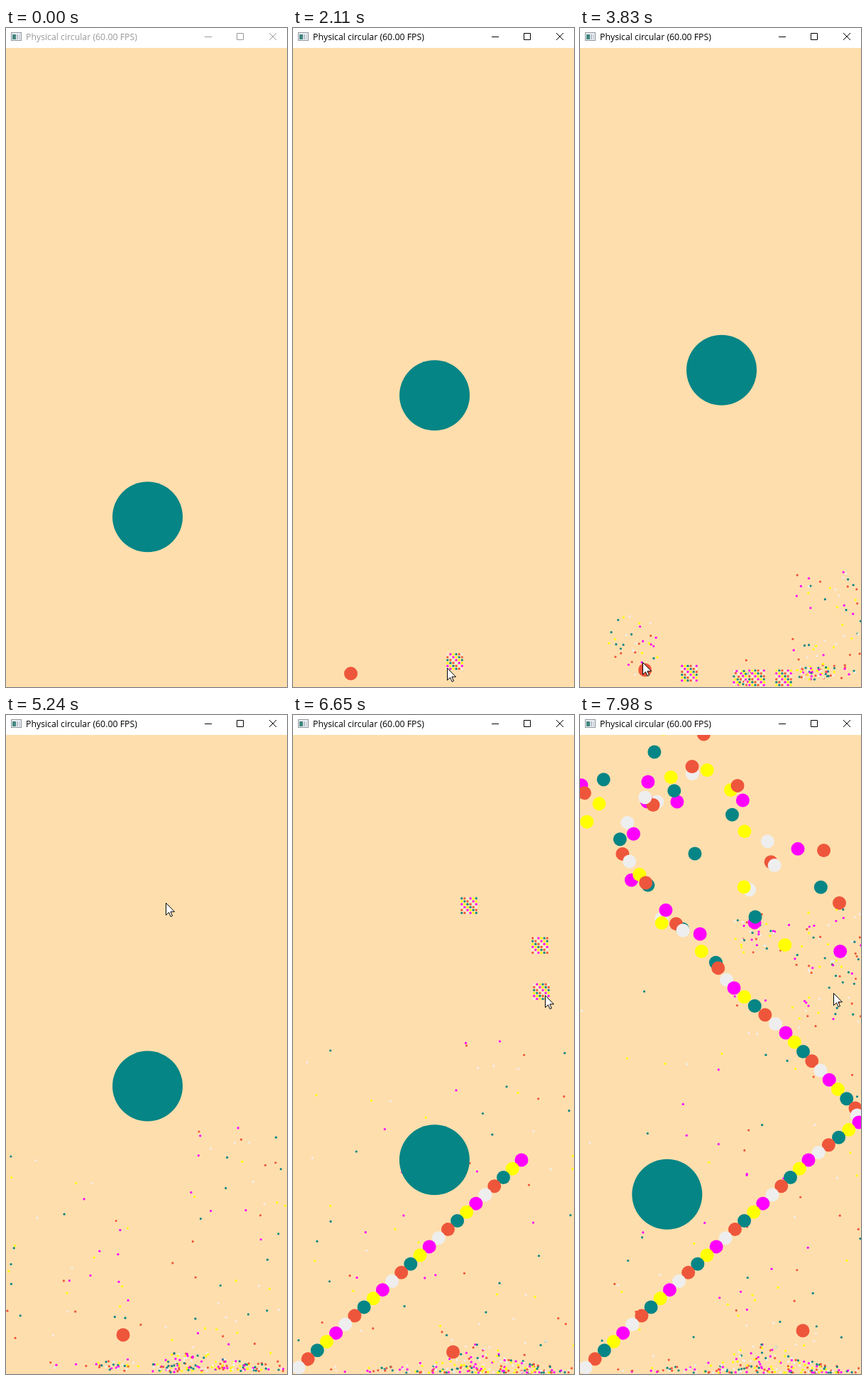
An HTML page with a canvas that plays this animation: 396 px wide and 927 px high, repeating every 8 s.

```html
<!DOCTYPE html>
<html lang="en">
<head>
<meta charset="utf-8">
<title>Physical circular</title>
<style>
  html, body { margin: 0; width: 100%; height: 100%; overflow: hidden; background: #ffdead; }
  canvas, svg { position: absolute; left: 0; top: 0; display: block; }
  svg { background: #fff; color: #999; }
  svg.active { color: #000; }
  text { font: 12.3px "Open Sans", "Noto Sans", sans-serif; fill: currentColor; }
  .buttons { fill: none; stroke: currentColor; }
</style>
</head>
<body>
<canvas id="stage" width="396" height="927"></canvas>
<svg id="bar" width="396" height="28">
  <rect x="7.5" y="6.5" width="14" height="11" fill="#eef1f4" stroke="#8d959d"/>
  <rect x="9" y="9" width="5" height="7" fill="#42867f"/>
  <rect x="15" y="9" width="2" height="7" fill="#b4c0ca"/>
  <rect x="18" y="9" width="2" height="7" fill="#ccd5dd"/>
  <text x="28" y="17">Physical circular (<tspan id="fps">60.00</tspan> FPS)</text>
  <g class="buttons">
    <path d="M280 12.5h10M325.5 7.5h9v9h-9z"/>
    <path d="M371 7l10 10M381 7l-10 10"/>
  </g>
</svg>
<script>
const WIDTH = 396, HEIGHT = 927, FLOOR = 925, LOOP = 8000, STEP = 78.3;
const HALF_GRAVITY = 15.8;
const TEAL = '#058585', RED = '#ee563b';
const PALETTE = ['#eeeeee', '#ff00ff', '#ffff00', TEAL, RED];

const ctx = document.getElementById('stage').getContext('2d');
const bar = document.getElementById('bar');
const fps = document.getElementById('fps');

const clamp = v => Math.max(0, Math.min(1, v));
const mix = (a, b, p) => a + (b - a) * p;
const random = (i, salt) => {
  const v = Math.sin(i * 127.1 + salt * 311.7) * 43758.5453;
  return v - Math.floor(v);
};
const fold = x => {
  x = Math.abs(x);
  return x > WIDTH ? 2 * WIDTH - x : x;
};

// Position on a path of [time, x, y] points; with gravity each leg is a ballistic arc.
function along(points, t, gravity = 0) {
  let i = 1;
  while (i < points.length - 1 && t > points[i][0]) i++;
  const [t0, x0, y0] = points[i - 1], [t1, x1, y1] = points[i];
  const p = clamp((t - t0) / (t1 - t0));
  return [mix(x0, x1, p), mix(y0, y1, p) - gravity * p * (1 - p) * (t1 - t0) ** 2];
}

function disc([x, y], radius, color) {
  ctx.fillStyle = color;
  ctx.beginPath();
  ctx.arc(x, y, radius, 0, 2 * Math.PI);
  ctx.fill();
}

const POINTER = new Path2D('M0 0V17L4 13.2L6.6 19L9 18L6.4 12.3H12Z');
const POINTER_PATH = [
  [.45, 120, 860], [.85, 72, 903], [1.7, 78, 905], [2.11, 217, 900],
  [3, 375, 900], [3.5, 145, 905], [3.8, 84, 911], [4.9, 215, 250],
  [5.24, 225, 264], [5.4, 243, 248], [6.55, 355, 394], [8, 357, 391]
];

const BALL_PATH = [
  [1.3, 81.5, 898], [2.42, 81.5, 917.5], [3.62, 81.5, 917], [3.83, 91.5, 903],
  [5.24, 165, 872], [6.65, 225.5, 896], [7.44, 285, 865], [7.98, 314, 866]
];

// Thrown up freely, then pushed aside by the jet.
function bigDisc(t) {
  const push = Math.max(0, t - 6.58), held = Math.max(0, t - 6.65);
  const free = t - held;
  const y = 480.6 + HALF_GRAVITY * (free - 3.62) ** 2 + 99 * held - 46.9 * held ** 2;
  return [199.5 - 37.75 * push ** 2.1, y];
}

// Blocks of 6 x 6 dots: spawn time, centre, burst time.
const BLOCKS = [
  [2.02, 228, 891, 3.7], [2.35, 249, 893, 3.9], [2.56, 287, 897, 3.9],
  [2.75, 320, 899, 3.3], [2.85, 347, 899, 3.1], [2.95, 377, 897, 3.05],
  [3.42, 154, 905, 3.95], [3.45, 78, 897, 3.46],
  [5.4, 248, 243.5, 7.55], [6, 348, 317.5, 7], [6.6, 350, 389, 7]
];

// Blocks in mid-air burst evenly; on the floor the outer ones scatter most.
function burstOf(x, y) {
  if (y < 800) return { flying: 1, side: 50, low: -30, high: 85 };
  const edge = Math.min(1, Math.abs(x - 230) / 150);
  return { flying: .1 + .8 * edge ** 4, side: 65 * edge, low: 25, high: 185 };
}

const heapHeight = x => 8 + 32 * Math.exp(-(((x - 255) / 60) ** 2));

function drawBlock([spawn, cx, cy, burst], index, t) {
  if (t < spawn) return;
  const { flying, side, low, high } = burstOf(cx, cy);
  const drop = HALF_GRAVITY * (Math.min(t, burst) - spawn) ** 2;
  const since = t - burst;
  for (let i = 0; i < 36; i++) {
    const col = i % 6, row = Math.floor(i / 6), id = index * 36 + i;
    let x = cx + (col - 2.5) * 4.1;
    let y = Math.min(914, cy + drop) + (row - 2.5) * 4.1;
    if (since > 0) {
      const u = random(id, 1), v = random(id, 2);
      if (random(id, 3) < flying) {
        x = fold(x + side * (2 * u - 1) * since ** .7);
        y += HALF_GRAVITY * since ** 2 - mix(low, high, v) * since;
        y = FLOOR - Math.abs(FLOOR - y);
      } else {
        x = fold(x + (u + v - 1) * 20 * Math.min(since, 3));
        y = mix(y, FLOOR - heapHeight(x) * random(id, 4) ** 2, clamp(since / 2.5));
      }
    }
    disc([x, y], 1.6, PALETTE[(col - row + index + 10) % 5]);
  }
}

// The jet emits one ball per tick. All follow one path, keyed by age in ticks,
// and stray further from it the longer they have left the straight part.
const JET_START = 6.25, TICKS = 60, LEAVE = 44;
const JET_PATH = [
  [0, 8, 918], [20, 271, 675], [24, 322, 626], [29, 393, 573], [31, 388, 553],
  [39, 290, 447], [LEAVE, 217, 384], [50, 155, 305], [56, 80, 262], [62, 30, 200],
  [69, 50, 105], [78, 140, 70], [88, 245, 120], [104, 345, 270]
];

function jetBall(n, age) {
  const [x, y] = along(JET_PATH, age);
  const stray = Math.min(85, Math.max(0, age - LEAVE) * 2.2);
  return [
    fold(x + stray * (2 * random(n, 5) - 1)),
    y + stray * (2 * random(n, 6) - 1)
  ];
}

function drawJet(t) {
  const newest = Math.round((t - JET_START) * TICKS);
  for (let n = 0; n <= newest; n++) disc(jetBall(n, newest - n), 9.5, PALETTE[(n + 1) % 5]);
}

function drawPointer(t) {
  if (t < POINTER_PATH[0][0]) return;
  const [x, y] = along(POINTER_PATH, t);
  ctx.save();
  ctx.translate(Math.round(x) + .5, Math.round(y) + .5);
  ctx.fillStyle = '#fff';
  ctx.strokeStyle = '#000';
  ctx.fill(POINTER);
  ctx.stroke(POINTER);
  ctx.restore();
}

function draw(t) {
  ctx.fillStyle = '#ffdead';
  ctx.fillRect(0, 0, WIDTH, HEIGHT);
  BLOCKS.forEach((block, i) => drawBlock(block, i, t));
  disc(bigDisc(t), 49.5, TEAL);
  if (t >= BALL_PATH[0][0]) disc(along(BALL_PATH, t, HALF_GRAVITY), 9.5, RED);
  drawJet(t);
  drawPointer(t);
  bar.classList.toggle('active', t > .75);
  fps.textContent = t > 2.9 && t < 3.7 ? '59.99' : '60.00';
}

let shown = -1;
function play() {
  const step = Math.floor((performance.now() % LOOP + 8.3) / STEP);
  if (step !== shown) {
    shown = step;
    draw(Math.max(0, step * STEP - 5) / 1000);
  }
  requestAnimationFrame(play);
}
play();
</script>
</body>
</html>
```
